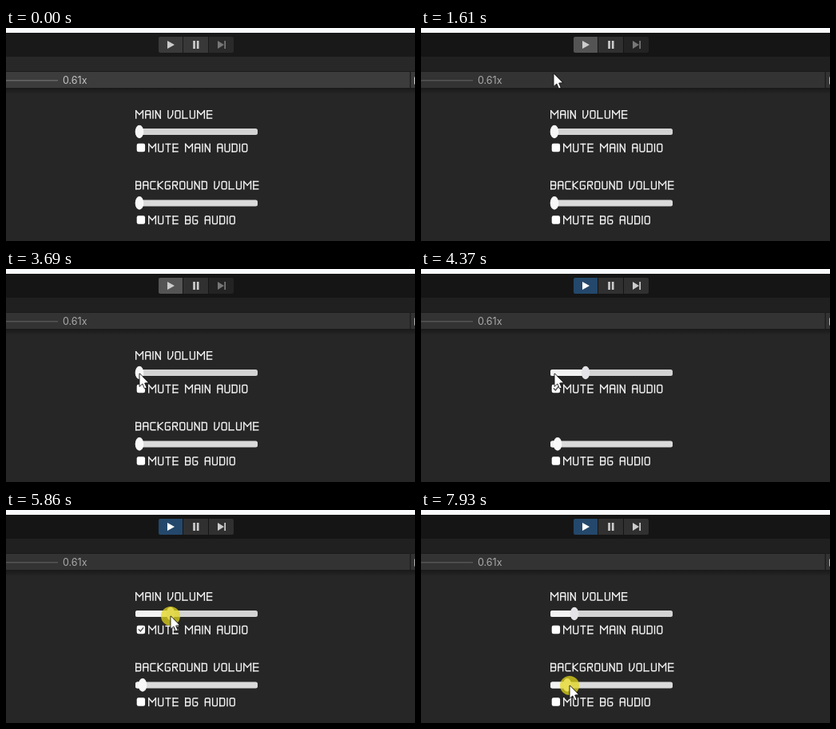
Recreate the animation shown at these times as an HTML page with a canvas. Size 512 px wide and 267 px high, loop 8 s.

```html
<!DOCTYPE html>
<html lang="en">
<head>
<meta charset="utf-8">
<title>Volume settings</title>
<style>
  html, body { margin: 0; width: 100%; height: 100%; overflow: hidden; background: #262626; }
  canvas { display: block; }
</style>
</head>
<body>
<canvas id="stage" width="512" height="267" role="img"
  aria-label="Main volume, mute main audio, background volume, mute BG audio"></canvas>
<script>
const ctx = document.getElementById('stage').getContext('2d');
const LOOP = 8000;
const PLAY_PRESSED = 1140, UI_GONE = 3890, PLAYING = 4160, UI_BACK = 4300;
const TYPE_START = 4520, TYPE_STEP = 50, UNMUTED = 7700;

// Letter strokes run over a 3 x 3 grid of nodes, named like the keys below.
const NODES = 'qweasdzxc';
const GLYPHS = {
  A: 'zqec ad', B: 'qz qecz ad', C: 'eqzc', D: 'qz qecz', E: 'qz qe ad zc',
  G: 'eqzcds', I: 'qz', K: 'qz ae ac', L: 'qz zc', M: 'zq qs se ec',
  N: 'zq qc ce', O: 'wqzcew', R: 'zqeda sc', T: 'qe wx', U: 'qzce', V: 'qzxde'
};

// Cursor moves: start, end, and the point reached.
const MOVES = [
  [450, 930, 204, 23], [1470, 1600, 166, 57], [1650, 2240, 157, 85],
  [2310, 3080, 162, 133], [3340, 3690, 167, 131], [4400, 4930, 206, 133],
  [5860, 6200, 192, 133], [6330, 6550, 177, 142], [6690, 6830, 173, 147],
  [6970, 7320, 172, 216], [7700, 7930, 186, 220]
];
const CLICKS = [[930, 1110], [5640, 6290], [7620, 8100]];

const clamp = v => Math.max(0, Math.min(1, v));
const mix = (a, b, p) => a + (b - a) * p;

function ease(t, start, end) {
  const p = clamp((t - start) / (end - start));
  return p * p * (3 - 2 * p);
}

function rect(x, y, w, h, color, radius = 0) {
  ctx.fillStyle = color;
  ctx.beginPath();
  ctx.roundRect(x, y, w, h, radius);
  ctx.fill();
}

function path(points) {
  ctx.beginPath();
  points.forEach(([x, y]) => ctx.lineTo(x, y));
}

function triangle(x, y, w, h, color) {
  ctx.fillStyle = color;
  path([[x, y], [x + w, y + h / 2], [x, y + h]]);
  ctx.fill();
}

function ellipse(x, y, rx, ry, color) {
  ctx.fillStyle = color;
  ctx.beginPath();
  ctx.ellipse(x, y, rx, ry, 0, 0, Math.PI * 2);
  ctx.fill();
}

function roundedStroke(points) {
  ctx.beginPath();
  ctx.moveTo(...points[0]);
  points.slice(1).forEach((p, i) => ctx.arcTo(...p, ...(points[i + 2] || p), 1.3));
  ctx.lineTo(...points.at(-1));
  ctx.stroke();
}

function lettering(text, x, y) {
  ctx.strokeStyle = '#f0f0f0';
  ctx.lineWidth = 1.45;
  ctx.lineCap = 'square';
  x += 0.7;
  for (const char of text) {
    if (char === ' ') { x += 6.3; continue; }
    const width = { M: 8.7, I: 0 }[char] ?? 5.8;
    for (const stroke of GLYPHS[char].split(' ')) {
      roundedStroke([...stroke].map(key => {
        const n = NODES.indexOf(key);
        return [x + (n % 3) * width / 2, y + Math.floor(n / 3) * 4.7];
      }));
    }
    x += width + 3.4;
  }
}

function editor(t) {
  const dim = t >= PLAY_PRESSED, playing = t >= PLAYING;
  rect(0, 0, 512, 267, '#262626');
  rect(0, 0, 512, 6, '#fafbfd');
  rect(0, 6, 512, 30, dim ? '#151515' : '#191919');
  rect(0, 36, 512, 18, dim ? '#202020' : '#282828');
  rect(0, 54, 512, 1, '#1b1b1b');
  rect(0, 55, 512, 20, dim ? '#333333' : '#3c3c3c');
  const shade = ctx.createLinearGradient(0, 75, 0, 83);
  shade.addColorStop(0, '#191919');
  shade.addColorStop(1, '#262626');
  rect(0, 75, 512, 8, shade);

  rect(0, 65, 65, 1.5, dim ? '#555' : '#666');
  ctx.fillStyle = dim ? '#aaa' : '#c4c4c4';
  ctx.font = '12.5px Inter, sans-serif';
  ctx.fillText('0.61x', 71, 70);
  rect(505.5, 55, 1.5, 20, '#1e1e1e');
  rect(511, 61.5, 1, 9, dim ? '#b0b0b0' : '#d0d0d0');

  const play = playing ? '#24486b' : t >= 1270 ? '#545454' : dim ? '#484848' : '#3a3a3a';
  const button = dim ? '#303030' : '#383838', idle = dim ? '#232323' : '#2a2a2a';
  const icon = '#cccccc', stepIcon = playing ? icon : '#777777';
  rect(191, 11, 30, 20, play, [2, 0, 0, 2]);
  rect(222, 11, 31, 20, button);
  rect(254, 11, 31, 20, playing ? button : idle, [0, 2, 2, 0]);
  triangle(202, 16, 9, 10, playing ? '#ffffff' : icon);
  rect(234.2, 16, 2.7, 10, icon);
  rect(238.8, 16, 2.7, 10, icon);
  triangle(265, 16, 8, 10, stepIcon);
  rect(273.3, 16, 1.7, 10, stepIcon);
}

function slider(y, handle, color, handleColor) {
  rect(162, y - 4, 153, 8, color, 2.5);
  rect(162, y - 4, handle - 162, 8, '#f2f2f2', 2.5);
  ellipse(handle, y, 5.3, 8.3, handleColor);
}

function checkbox(y, checked) {
  rect(163.7, y - 5.2, 10.4, 10.4, '#ffffff', 2.2);
  if (!checked) return;
  ctx.strokeStyle = '#444';
  ctx.lineWidth = 1.3;
  path([[166.3, y], [168.3, y + 2], [171.7, y - 2.2]]);
  ctx.stroke();
}

function settings(t) {
  if (t >= UI_GONE && t < UI_BACK) return;
  const live = t >= UI_BACK;
  const typed = live ? Math.max(0, Math.floor((t - TYPE_START) / TYPE_STEP)) : Infinity;
  const mainHandle = live ? mix(206, 192, ease(t, 5860, 6200)) : 167;
  const bgHandle = live ? mix(171, 183, ease(t, 7700, 7930)) : 167;
  lettering('MAIN VOLUME'.slice(0, typed), 162, 103.7);
  slider(130, mainHandle, '#d3d3d3', live ? '#e4e4e8' : '#f6f6f6');
  checkbox(150, live && t < UNMUTED);
  lettering('MUTE MAIN AUDIO', 178, 145.5);
  lettering('BACKGROUND VOLUME'.slice(0, typed), 162, 192.4);
  slider(219.4, bgHandle, '#dadada', '#f8f8f8');
  checkbox(240.5, false);
  lettering('MUTE BG AUDIO', 178, 236);
}

function cursorAt(t) {
  let x = 530, y = 224;
  for (const [start, end, toX, toY] of MOVES) {
    const p = ease(t, start, end);
    x = mix(x, toX, p);
    y = mix(y, toY, p);
  }
  return [x, y];
}

function cursor(t) {
  const [x, y] = cursorAt(t);
  for (const [from, to] of CLICKS) {
    const glow = clamp((t - from) / 80) * clamp((to - t) / 80);
    if (glow) ellipse(x, y, 12, 12, `rgba(226, 214, 28, ${0.75 * glow})`);
  }
  ctx.save();
  ctx.translate(x, y);
  path([[0, 0], [0, 16.4], [3.8, 13], [6.5, 19], [9.2, 17.8], [6.7, 12], [11.6, 11.7]]);
  ctx.closePath();
  ctx.fillStyle = '#ffffff';
  ctx.strokeStyle = '#111';
  ctx.lineWidth = 0.9;
  ctx.fill();
  ctx.stroke();
  ctx.restore();
}

function draw() {
  const t = performance.now() % LOOP;
  editor(t);
  settings(t);
  cursor(t);
  requestAnimationFrame(draw);
}
draw();
</script>
</body>
</html>
```
